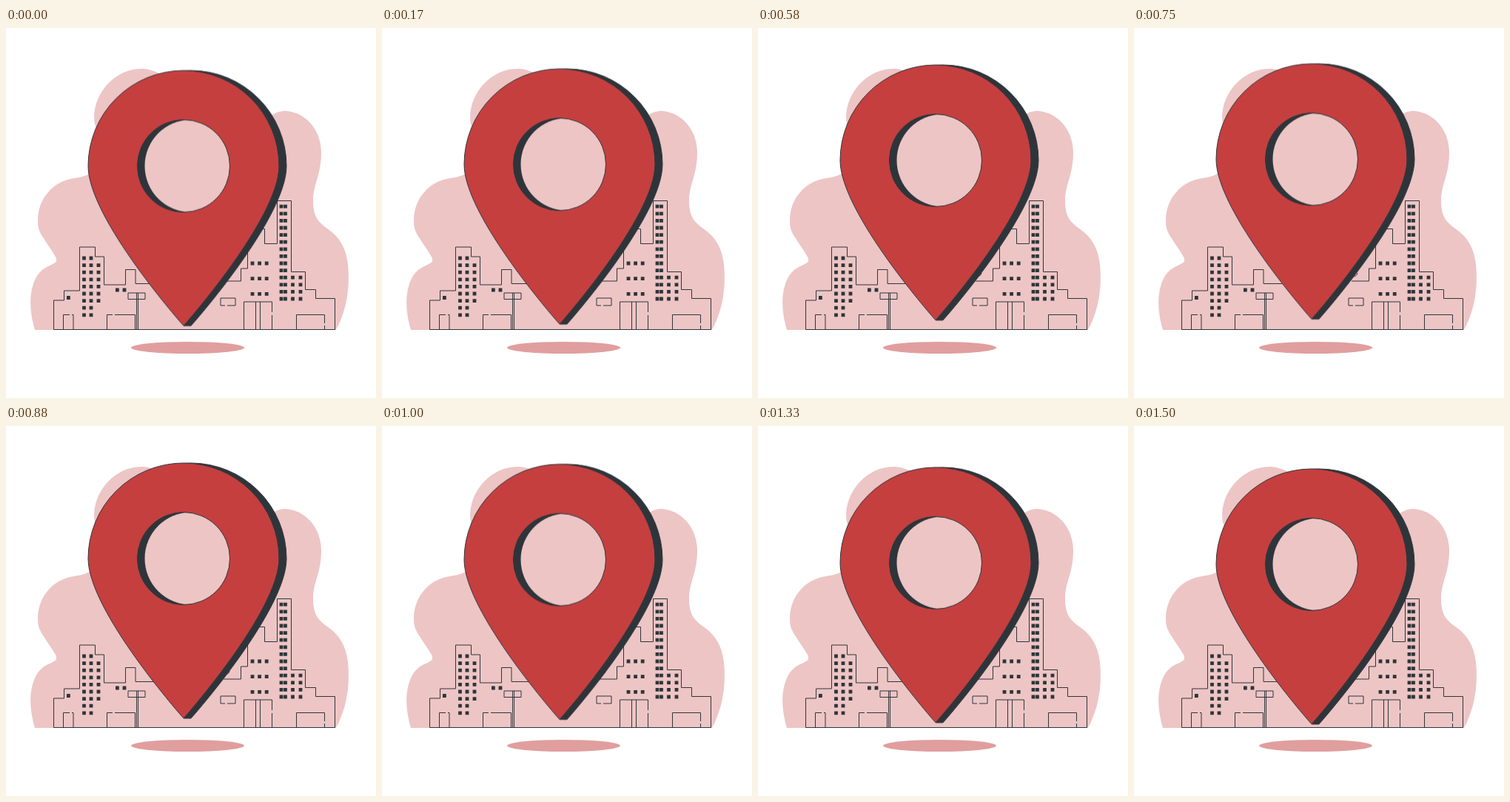
An HTML page for the animation above (1.54 s loop, 500 by 500 pixels).

```html
<!DOCTYPE html>
<html lang="en">
<head>
<meta charset="utf-8">
<title>Map pin over a city</title>
<style>
  html, body { margin: 0; width: 100%; height: 100%; overflow: hidden; background: #fff; }
  svg { display: block; width: 100vw; height: 100vh; }
  .blob { fill: #edc5c5; }
  .shadow { fill: #e19e9e; }
  .line { fill: none; stroke: #2e353a; }
  .dark { fill: #2e353a; }
  .red { fill: #c53f3f; }
  .edge { stroke: #2e353a; stroke-linejoin: bevel; }
  /* Every window is one dash, so all blocks share the same pitch */
  .windows { fill: none; stroke: #2e353a; stroke-width: 4.8; stroke-dasharray: 4.8; }
  .pin { animation: float 1540ms linear -45ms infinite; }
  @keyframes float {
    50% { transform: translateY(-10px); }
  }
</style>
</head>
<body>
<svg viewBox="0 0 500 500">
  <defs>
    <path id="drop" d="M240 403S111 258 111 187A129 129 0 0 1 369 187C369 258 240 403 240 403Z"/>
    <circle id="ring" cx="240" cy="187" r="62.5"/>
    <clipPath id="hole"><use href="#ring"/></clipPath>
  </defs>

  <path class="blob" d="M39 408C33 388 31 366 36 349S49 325 59 321S68 315 68 312S57 294 50 283
    S43 267 43 258C44 231 63 207 92 203S130 190 121 133C112 100 140 55 184 55
    S300 150 359 118C365 114 371 112 377 112C404 113 426 137 426 168S415 211 415 233
    S422 262 434 271C455 285 463 305 463 336S456 389 446 408Z"/>
  <ellipse class="shadow" cx="245.5" cy="432" rx="76.5" ry="8"/>

  <!-- Skylines -->
  <path class="line" d="M200 345.5H175V326.5H161.500V347H132.500V309H120.500V296H99.500V355H78.500V368H64.500
    V407.500H444.500V365.500H418.500V353.500H404.500V329.500H385.500V233.500H366.500V291.500H349.500V271.500
    H326.500V325H317.500V342H294"/>
  <!-- Doors, sign and poles -->
  <path class="line" d="M77.500 407V387.500H86m3 0h2V407M136.500 407V387.500H144m3 0H174.500V407
    M165 358h23v8.500h-23zM176.500 358V407m2 0V358
    M296 375H290V365H310V375H299M296 335.500q5 .5 6-4.500
    M321.500 407V370H359.500V384m0 4V407M337.500 370V407m6 0V370
    M392.500 407V387.500H430.500V399m0 3V407"/>
  <path class="windows" d="M105.500 308.600v81.600M115 308.600v81.600M125 318.200v52.800M82 364.500h4.800M148 354h14.400
    M372 238.800v129.600M377.500 238.800v129.600M387.500 334.800v33.600M398 334.800v33.600
    M330.600 318h24M330.600 338.700h24M330.600 359.400h24"/>

  <g class="pin">
    <use href="#drop" x="10" class="dark edge"/>
    <path class="dark edge" d="M240 403h10l-5-7z"/>
    <use href="#drop" class="red edge"/>
    <use href="#ring" class="dark"/>
    <g clip-path="url(#hole)"><use href="#ring" x="10" class="blob"/></g>
    <use href="#ring" class="line"/>
  </g>
</svg>
</body>
</html>
```
